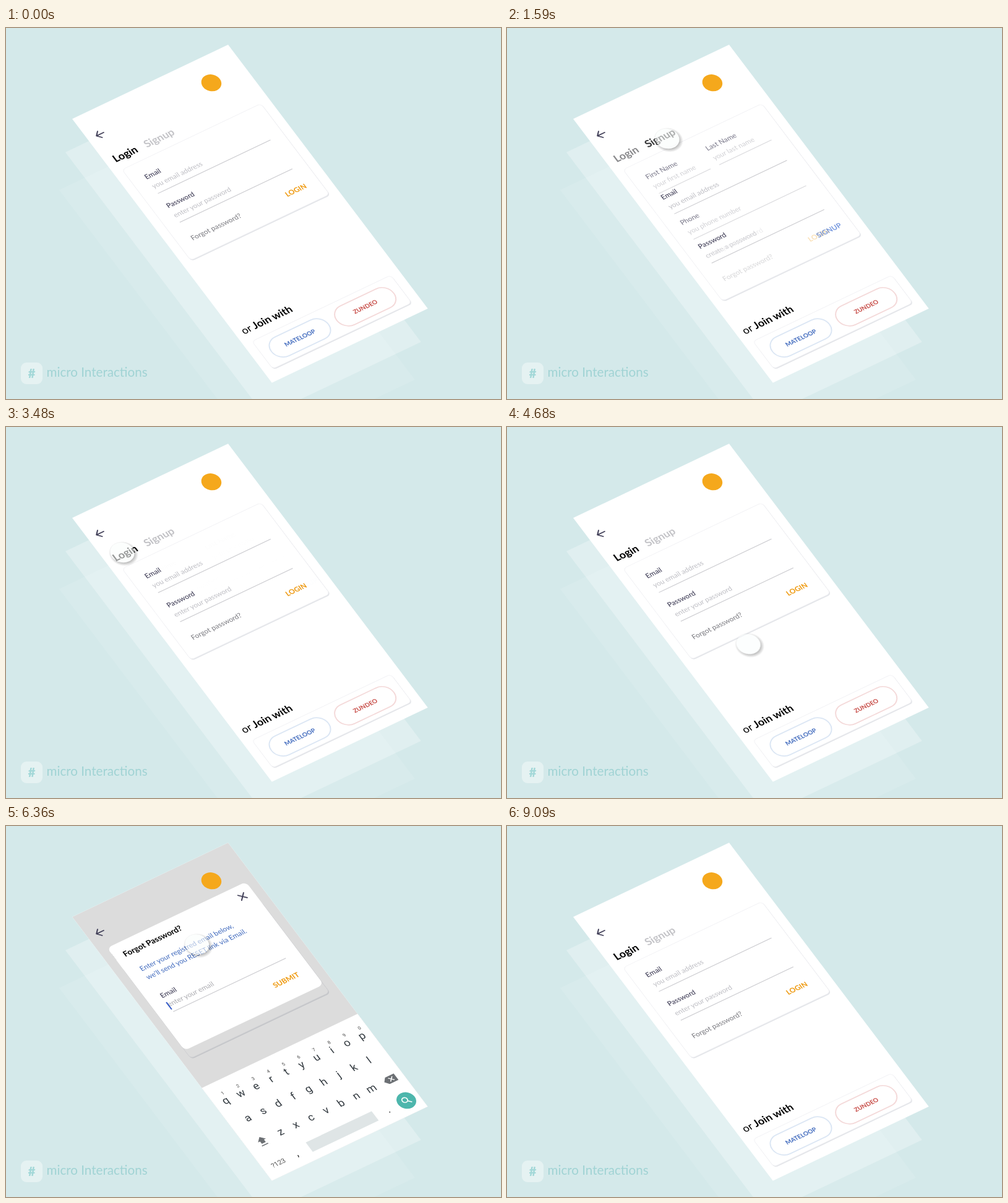
An HTML page that plays this animation: 800x600 px, repeating every 9840 ms.

```html
<!DOCTYPE html>
<html lang="en">
<head>
<meta charset="utf-8">
<title>Login and signup</title>
<style>
  html, body { margin: 0; width: 100%; height: 100%; overflow: hidden; background: #d4e9ea; }
  svg { display: block; width: 800px; height: 600px; font-family: Lato, "Open Sans", sans-serif; }
  .keys { font-family: Roboto, Arial, sans-serif; }
  .rule { stroke: #cdcdd1; stroke-width: 1.2; }
  .icon { fill: none; stroke: #3f3d56; stroke-width: 1.8; stroke-linecap: round; stroke-linejoin: round; }
</style>
</head>
<body>
<svg id="stage" viewBox="0 0 800 600"></svg>
<script>
const LOOP = 9840;
const INK = '#3f3d56', HINT = '#bdbdc3', ORANGE = '#ee980c', BLUE = '#3f69bd';
// The screen is a flat 279 x 535 sheet laid out by an affine transform.
const plane = (x, y) => `matrix(.9029 -.43 .6033 .7975 ${x} ${y})`;

const text = (x, y, str, size = 11.4, fill = INK, weight = 400, anchor = 'start') =>
  `<text x="${x}" y="${y}" font-size="${size}" fill="${fill}" font-weight="${weight}" text-anchor="${anchor}">${str}</text>`;
const rect = (x, y, w, h, r, style) =>
  `<rect x="${x}" y="${y}" width="${w}" height="${h}" rx="${r}" ${style}/>`;
const rule = (y, x1 = 38.5, x2 = 240) => `<line class="rule" x1="${x1}" x2="${x2}" y1="${y}" y2="${y}"/>`;
const group = (id, ...parts) => `<g id="${id}">${parts.join('')}</g>`;
const card = (id, y, h) =>
  rect(15, y + 2, 249, h, 6, `id="${id}Shadow" fill="#e2e4e8"`) +
  rect(15, y, 248.5, h, 6, `id="${id}" fill="#fff" stroke="#f1f1f4" stroke-width=".9"`);
const sheet = (x, y, opacity) =>
  `<g transform="${plane(x, y)}">${rect(0, 0, 279, 535, 0, `fill="#fff" opacity="${opacity}"`)}</g>`;
const pill = (x, label, border, fill) =>
  rect(x, 469, 102, 38, 19, `fill="#fff" stroke="${border}" stroke-width="1.8"`) +
  text(x + 51, 491.5, label, 9.8, fill, 700, 'middle');

const keyRow = (letters, x, y) =>
  [...letters].map((c, i) => text(x + 27.1 * i, y, c, 17.5, '#333a40', 400, 'middle')).join('');

const header =
  '<path class="icon" d="M28 42.5H15M21 36.5L15 42.5L21 49"/>' +
  '<circle cx="219" cy="45" r="15" fill="#f5a81c"/>';

const tabs =
  text(14, 96, 'Login', 17, '#c3c3c7', 700) + text(69.5, 96, 'Signup', 17, '#c3c3c7', 700) +
  group('loginTab', text(14, 96, 'Login', 17, '#000', 700)) +
  group('signupTab', text(69.5, 96, 'Signup', 17, '#000', 700));

const form =
  card('form', 111, 184) +
  group('names',
    text(37.5, 143, 'First Name'), text(38, 162, 'your first name', 11.3, HINT), rule(172, 38.5, 131),
    text(145, 143, 'Last Name'), text(145, 162, 'your last name', 11.3, HINT), rule(172, 146.5, 240)) +
  group('email',
    group('emailLabel', text(37.5, 143, 'Email', 11.4, INK, 500)),
    group('emailCaps', text(37.5, 143, 'EMAIL', 9.8, '#9a9aa2', 700)),
    text(38, 162, 'you email address', 11.3, HINT), rule(172)) +
  group('phone',
    text(37.5, 260, 'Phone'), text(38, 279, 'you phone number', 11.3, HINT), rule(289)) +
  group('password',
    group('passwordLabel', text(37.5, 201.5, 'Password', 11.4, INK, 500)),
    group('passwordCaps', text(37.5, 201.5, 'PASSWORD', 9.8, '#9a9aa2', 700)),
    group('enterHint', text(37.5, 220.5, 'enter your password', 11.3, HINT)),
    group('createHint', text(37.5, 220.5, 'create a password', 11.3, HINT)),
    group('strongHint', text(37.5, 220.5, 'create a strong password', 11.2, HINT)),
    rule(230.6)) +
  group('forgot', text(37.5, 267, 'Forgot password?', 11.4, '#77777d')) +
  group('forgotCaps', text(37.5, 267, 'FORGOT PASSWORD?', 10.8, '#9a9aa2')) +
  group('loginButton', text(241, 269, 'LOGIN', 11.5, ORANGE, 700, 'end')) +
  group('signupButton', text(241, 269, 'SIGNUP', 11.5, '#3d6dd0', 700, 'end'));

const join =
  `<text x="11.5" y="443.5" font-size="17">or <tspan font-weight="700">Join with</tspan></text>` +
  card('join', 459, 56) +
  pill(30.5, 'MATELOOP', '#dbe6f4', BLUE) + pill(147.5, 'ZUNDEO', '#f4d9d9', '#c64843');

const dialog = group('dialog',
  rect(15, 71, 248.5, 208, 8, 'id="dialogBox" fill="#fff"'),
  group('dialogTitle', text(30, 97.5, 'Forgot Password?', 13, '#000', 700)),
  group('dialogNote',
    text(37.5, 130.5, 'Enter your registred email below,', 11.5, BLUE),
    text(37.5, 147.5, 'we’ll send you RESET link via Email.', 11.5, BLUE)),
  group('dialogField',
    text(37.5, 185, 'Email', 11.4, INK, 500), text(38.5, 203, 'enter your email', 11.4, '#aaaaaf'), rule(213),
    '<line x1="38.8" x2="38.8" y1="194" y2="208.5" stroke="#2f57c8" stroke-width="1.9"/>'),
  group('submit', text(241, 250, 'SUBMIT', 11.8, ORANGE, 700, 'end')),
  group('close', '<path class="icon" d="M-5 -5L5 5M-5 5L5 -5"/>'));

const keyboard = group('keyboard',
  rect(0, 347, 279, 188, 0, 'fill="#fff"'),
  '<g class="keys">',
  keyRow('qwertyuiop', 19, 388.5), keyRow('asdfghjkl', 31, 430), keyRow('zxcvbnm', 60, 474),
  [...'1234567890'].map((c, i) => text(22.5 + 27.2 * i, 372, c, 7.6, '#444', 400, 'middle')).join(''),
  text(26, 517, '?123', 11, '#555', 400, 'middle'),
  text(59.5, 517, ',', 17, '#333', 400, 'middle'), text(223.5, 517, '.', 17, '#333', 400, 'middle'), '</g>',
  rect(82.5, 502, 118, 19, 0, 'fill="#dfe5e6"'),
  '<path fill="#6c7074" d="M27 461L34 468H30.5V473H23.5V468H20ZM21.5 475.5H32.5V477H21.5Z"/>',
  '<path fill="#6c7074" d="M246 468L251.5 461.5H267V474.5H251.5Z"/>',
  '<path stroke="#fff" stroke-width="1.5" d="M255 464.5L262 471.5M255 471.5L262 464.5"/>',
  '<circle cx="256.8" cy="510.8" r="14.7" fill="#4db6ac"/>',
  '<path fill="none" stroke="#fff" stroke-width="1.7" d="M258.5 512.5L263 517M259.5 509A4.3 4.3 0 1 1 250.9 509A4.3 4.3 0 1 1 259.5 509"/>');

document.getElementById('stage').innerHTML =
  `<defs>
    <clipPath id="screen">${rect(0, 0, 279, 535, 0, '')}</clipPath>
    <radialGradient id="halo">
      <stop offset=".7" stop-opacity=".45"/><stop offset="1" stop-opacity="0"/>
    </radialGradient>
  </defs>` +
  rect(0, 0, 800, 600, 0, 'fill="#d4e9ea"') +
  sheet(86, 262, .1) + sheet(96, 201, .28) + sheet(107, 147, 1) +
  `<g transform="${plane(107, 147)}" clip-path="url(#screen)">` +
  tabs + form + join + rect(0, 0, 279, 535, 0, 'id="shade"') + header + dialog + keyboard + '</g>' +
  group('pointer',
    '<circle cx=".4" cy="2.7" r="22" fill="url(#halo)"/>',
    '<circle r="18" fill="#fbfefd"/>') +
  rect(24, 541, 35, 35, 9, 'fill="#e5f2f2"') +
  text(41.5, 565.5, '#', 20, '#a3d8d8', 900, 'middle') +
  text(65.5, 564.3, 'micro Interactions', 20.6, '#a0d3d4');

const part = {};
document.querySelectorAll('[id]').forEach(el => part[el.id] = el);

const clamp = x => Math.min(1, Math.max(0, x));
const easeOut = x => 1 - (1 - clamp(x)) ** 3;
const easeInOut = x => (x = clamp(x), x * x * (3 - 2 * x));
const since = (t, start) => easeOut((t - start) / 600);

const move = (id, dx, dy) => part[id].setAttribute('transform', `translate(${dx} ${dy})`);
const fade = (id, opacity) => part[id].setAttribute('opacity', opacity);

// Pointer arcs: start, end, then from, bend and to in stage pixels.
const arcs = [
  [60, 1200, [617, 345], [430, 235], [259, 179]],
  [2010, 2860, [259, 179], [224, 197], [188, 203]],
  [3900, 4950, [188, 203], [500, 445], [355, 320]],
  [5900, 6820, [355, 320], [248, 168], [384, 112]],
];

function drawPointer(t) {
  const [start, end, from, bend, to] = arcs.findLast(a => t >= a[0]) || arcs[0];
  const e = easeInOut((t - start) / (end - start));
  const [x, y] = from.map((v, i) => (1 - e) ** 2 * v + 2 * e * (1 - e) * bend[i] + e * e * to[i]);
  part.pointer.setAttribute('transform', plane(x, y));
  fade('pointer', .6 * clamp((t - 20) / 200) * clamp((8200 - t) / 280));
}

function drawForm(signup, caps) {
  const grow = 117 * signup;
  part.form.setAttribute('height', 184 + grow);
  part.formShadow.setAttribute('height', 184 + grow);
  fade('loginTab', 1 - signup);
  fade('signupTab', signup);
  fade('names', signup);
  move('email', 0, 58.6 * signup);
  move('phone', 0, -82 * (1 - signup));
  fade('phone', signup);
  move('password', 0, grow);
  fade('enterHint', (1 - signup) * (1 - caps));
  fade('createHint', signup);
  fade('strongHint', caps);
  for (const id of ['emailCaps', 'passwordCaps', 'forgotCaps']) fade(id, caps);
  for (const id of ['emailLabel', 'passwordLabel']) fade(id, 1 - caps);
  move('forgot', 0, grow);
  fade('forgot', (1 - signup) * (1 - caps));
  move('loginButton', -23 * signup, grow);
  fade('loginButton', 1 - signup);
  move('signupButton', 20 * (1 - signup), grow);
  fade('signupButton', signup);
}

function drawDialog(open, closing) {
  const shut = 1 - open;
  part.shade.setAttribute('fill', closing ? '#050550' : '#000');
  fade('shade', .138 * open);
  fade('dialog', open);
  fade('keyboard', open);
  move('keyboard', 0, 188 * shut);
  part.dialogBox.setAttribute('y', 71 + 186 * shut);
  part.dialogBox.setAttribute('height', 208 - 168 * shut);
  move('dialogTitle', 4 * shut, 180 * shut);
  move('dialogNote', 0, 143 * shut);
  move('dialogField', 0, 90 * shut);
  move('submit', 0, 20 * shut);
  part.close.setAttribute('transform',
    `translate(${244.5 - 26 * shut} ${90.5 + 97 * shut}) rotate(${-45 * shut})`);
}

function frame() {
  const t = performance.now() % LOOP;
  const closing = t >= 7826;
  drawForm(since(t, 1390) - since(t, 3000), closing ? clamp((9090 - t) / 90) : 0);
  drawDialog(since(t, 5010) - since(t, 7826), closing);
  drawPointer(t);
  requestAnimationFrame(frame);
}
frame();
</script>
</body>
</html>
```
